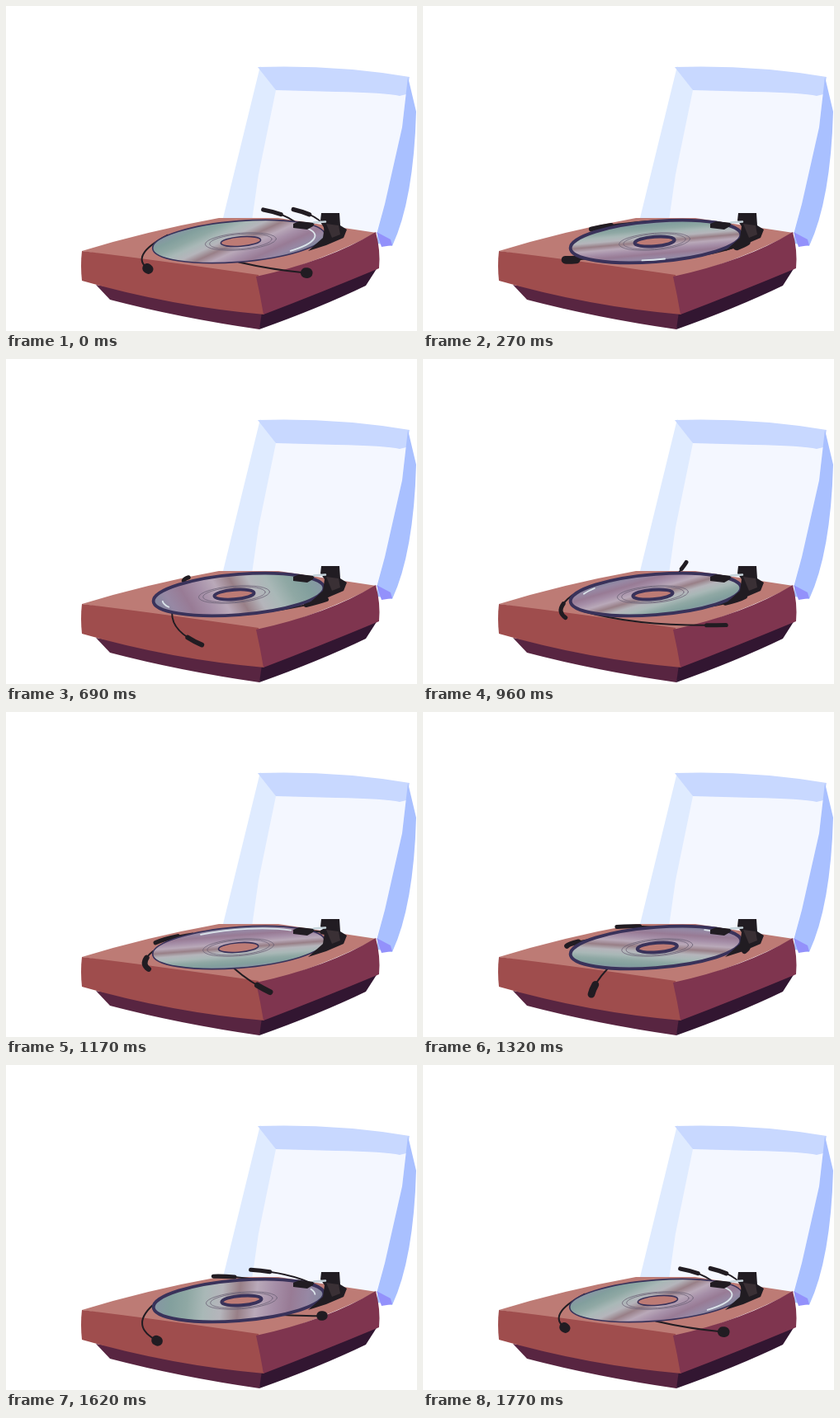
An HTML page with a canvas for the animation above (1800 ms loop, 498 by 394 pixels).

```html
<!DOCTYPE html>
<html>
<head>
<meta charset="utf-8">
<style>
  html, body { margin: 0; width: 100%; height: 100%; overflow: hidden; background: #fff; }
  canvas { display: block; }
</style>
</head>
<body>
<canvas id="stage" width="498" height="394"></canvas>
<script>
const ctx = document.getElementById('stage').getContext('2d');
const TAU = Math.PI * 2, RAD = Math.PI / 180;
const STEP = 30, STEPS = 60;
const INK = '#211c22', RIM = '#39325a', TOP = '#bd7b75';
const SHEEN = ['#8795a5', '#829f9d', '#8fa8a4', '#a9b8b7', '#b5b5bb', '#987f87',
               '#b9a9b9', '#a68fa8', '#987b95', '#9788a4', '#80869d'];

// The platter plane: a unit circle sheared into a slightly tilted ellipse.
const PLANE = { x: 282, y: 285.5, w: 105, h: 25, tilt: -8 };
const toScreen = (angle, r) => {
  const u = r * Math.cos(angle), v = r * Math.sin(angle);
  return [PLANE.x + PLANE.w * u, PLANE.y + PLANE.tilt * u + PLANE.h * v];
};
const lerp = (a, b, f) => a + (b - a) * f;
const mix = (p, q, f) => [lerp(p[0], q[0], f), lerp(p[1], q[1], f)];
const sin2 = a => Math.sin(a) ** 2;
const bump = a => Math.max(0, Math.cos(a)) ** 4;

// Loose parts surge ahead and fall back twice per turn.
const drift = spin => 40 * RAD * sin2(spin);

// Degrees on the disc: where a limb is fixed, where its tip rests, how far it sways.
const limbs = [
  { root: 215, rest: 136, sway: 50 },
  { root: 90, rest: 66, sway: 20 },
  { root: 310, rest: 281, sway: -55 },
  { root: 360, rest: 295, sway: 10 }
];

const fill = (color, d) => {
  ctx.fillStyle = color;
  ctx.fill(new Path2D(d));
};
const stroke = (color, width) => {
  ctx.strokeStyle = color;
  ctx.lineWidth = width;
  ctx.stroke();
};

function drawLid() {
  fill('#f4f7ff', 'M320 95L487 87 480 147 459 240 449 275 290 262Z');
  fill('#dfebff', 'M308 73L327 102 306 204 298 260 263 257Z');
  fill('#c8d8ff', 'M305 74Q400 71 489 86L485 107 477 109Q460 105 400 104L327 102Z');
  fill('#a9c0ff', 'M487 86L497 128Q494 235 468 291L450 288V273L459 240 480 147Z');
  fill('#9391fb', 'M449 274L466 283 468 290 455 292Z');
}

function drawBox() {
  fill('#582541', 'M109 338L126 356Q210 378 307 392L315 370Z');
  fill('#321631', 'M310 371L452 314 436 339Q380 366 307 392Z');
  fill(TOP, 'M92 297Q170 273 258 257L330 257 449 275Q380 310 304 331Z');
  fill('#9f4d4d', 'M92 297Q190 309 306 326L313 374Q200 364 92 333Q90 314 92 297Z');
  fill('#7f354f', 'M303 328Q390 309 448 274Q454 296 452 318Q380 348 312 374Q308 350 303 328Z');
}

function drawLimb({ root, rest, sway }, spin) {
  const base = root * RAD + spin;
  const end = rest * RAD + spin + drift(spin) + sway * RAD * sin2(spin / 2);
  // Tips hang over the front edge and rise a little behind the back edge.
  const reach = 1.1 + 1.3 * bump(end - 92 * RAD) + .4 * bump(end - 290 * RAD);
  const a = toScreen(base, 1);
  const b = toScreen(lerp(base, end, .6), lerp(1.15, reach, .5));
  const c = toScreen(end, reach);

  // Feet turn from long and thin to short and round.
  const width = 5 + Math.cos(spin / 2) ** 2 * (4 + 4 * Math.sin(end));
  const length = Math.max(2, 42 - 3.5 * width);
  const from = Math.max(.3, 1 - length / 2 / Math.hypot(c[0] - b[0], c[1] - b[1]));
  const bc = mix(b, c, from);
  ctx.lineCap = 'round';
  ctx.beginPath();
  ctx.moveTo(...a);
  ctx.quadraticCurveTo(...b, ...c);
  stroke(INK, 2);
  ctx.beginPath();
  ctx.moveTo(...mix(mix(a, b, from), bc, from));
  ctx.quadraticCurveTo(...bc, ...c);
  stroke(INK, width);
}

// Run a drawing in the unit space of the platter.
function onPlane(x, draw) {
  ctx.save();
  ctx.transform(PLANE.w, PLANE.tilt, 0, PLANE.h, x, PLANE.y);
  draw();
  ctx.restore();
}
const arc = (x, r, from = 0, to = TAU) => onPlane(x, () => {
  ctx.beginPath();
  ctx.arc(0, 0, r, from, to);
});

function drawDisc(spin) {
  const flat = bump(3 * spin);
  const rim = 3.9 - 2.3 * flat;
  const hub = 281 + 4.5 * Math.cos(spin + 40 * RAD);
  const shine = spin + drift(spin) + 10 * RAD;
  const reach = .15 + .5 * flat;

  onPlane(PLANE.x, () => {
    ctx.rotate(spin + 212 * RAD);
    const sheen = ctx.createLinearGradient(1, 0, -1, 0);
    SHEEN.forEach((color, i) => sheen.addColorStop(i / (SHEEN.length - 1), color));
    ctx.fillStyle = sheen;
    ctx.beginPath();
    ctx.arc(0, 0, 1, 0, TAU);
    ctx.fill();
  });
  arc(PLANE.x, 1 - rim / 250);
  stroke(RIM, rim);
  arc(PLANE.x, .88, shine - reach, shine + reach);
  stroke('#dbe4ea', 1.8);
  for (const r of [.36, .41]) {
    arc(hub, r);
    stroke('#6d6376', .8);
  }
  arc(hub, .23);
  ctx.fillStyle = TOP;
  ctx.fill();
  stroke(RIM, rim);
}

function drawArm() {
  fill(INK, 'M382 251H404L405 266 413 271 409 281 388 290 366 297 384 281 386 267 381 260Z');
  fill('#3a3035', 'M388 264L403 266 405 277 395 281Z');
  fill(INK, 'M348 264L355 261 374 263 372 267 365 271 348 269Z');
  ctx.beginPath();
  ctx.moveTo(373, 262.5);
  ctx.lineTo(387, 261.5);
  stroke('#c5d3da', 2.5);
}

function frame(now) {
  // The last step shows the first pose again.
  const spin = Math.floor(now / STEP) % STEPS / (STEPS - 1) * TAU;
  ctx.clearRect(0, 0, 498, 394);
  drawLid();
  drawBox();
  limbs.forEach(limb => drawLimb(limb, spin));
  drawDisc(spin);
  drawArm();
}

let start;
function tick(now) {
  start ??= now;
  frame(now - start);
  requestAnimationFrame(tick);
}
frame(0);
requestAnimationFrame(tick);
</script>
</body>
</html>
```
